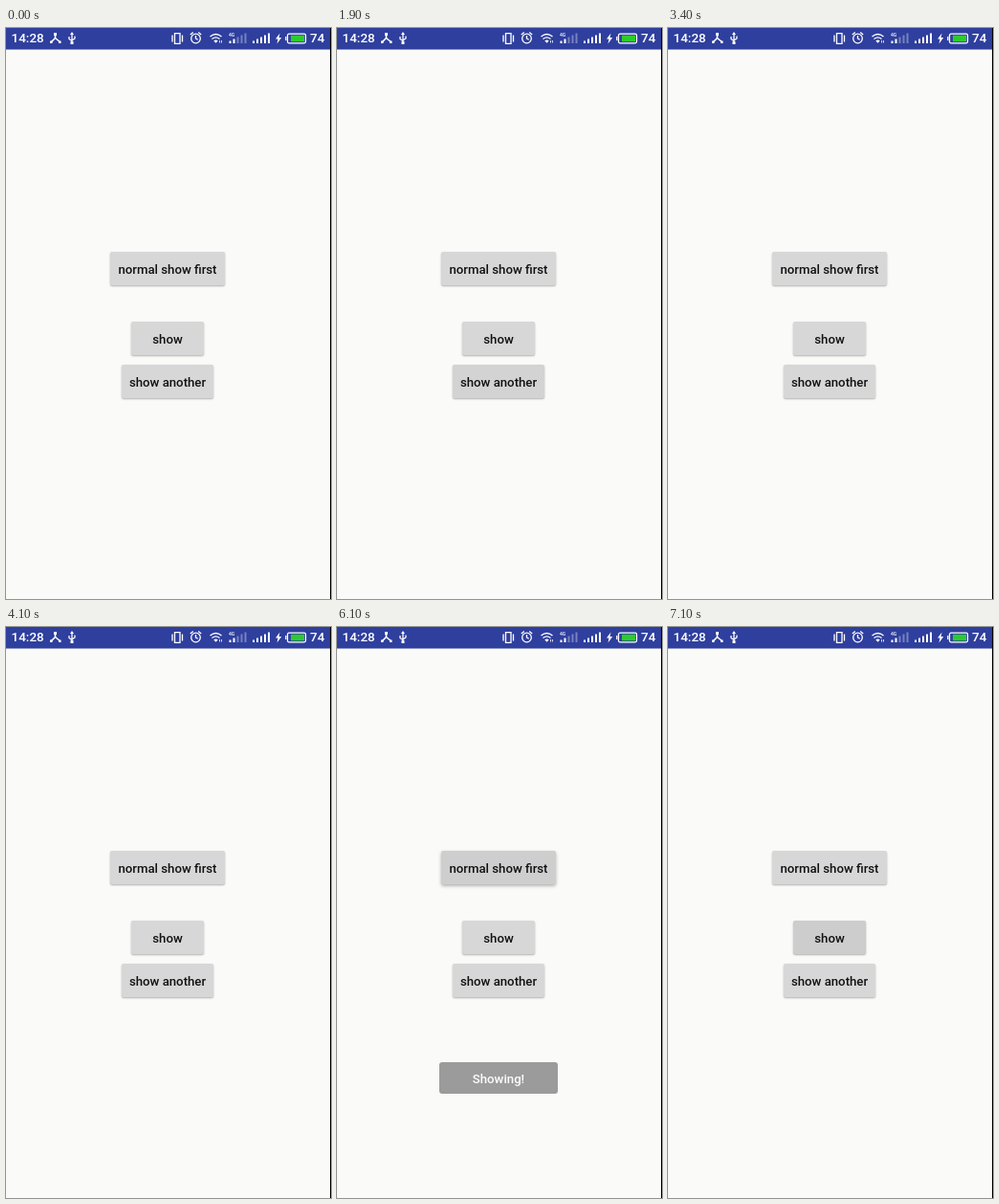
Recreate the animation shown at these times as an HTML page. Size 340 by 597 pixels, loop 8 s.

```html
<!DOCTYPE html>
<html lang="en">
<head>
<meta charset="utf-8">
<style>
html, body { margin: 0; width: 100%; height: 100%; overflow: hidden; background: #fafaf9; }
svg { position: absolute; left: 0; top: 0; }
.box {
  position: absolute; left: 169px; transform: translateX(-50%);
  box-sizing: border-box; height: 35px; padding-top: 1px; border-radius: 2px;
  display: flex; align-items: center; justify-content: center;
  font: 500 13.2px Roboto, sans-serif; color: #111; white-space: nowrap;
}
#first { top: 234px; width: 120px; }
#show { top: 307px; width: 76px; }
#another { top: 352px; width: 96px; }
#toast { top: 455px; width: 124px; height: 33px; background: #515151; color: #fff; border-radius: 3px; }
#dot {
  position: absolute; left: 174px; box-sizing: border-box; width: 22px; height: 22px; border-radius: 50%;
  background: rgba(250, 250, 255, .72); border: 1.2px solid rgba(150, 158, 195, .8);
}
</style>
</head>
<body>
<svg width="340" height="597" fill="none" stroke="#fff" stroke-width="1.3">
  <path d="M0 0h340v22.400H0z" fill="#2f3f9e" stroke="none"/>
  <path d="M339 0h1v597h-1z" fill="#000" stroke="none"/>
  <g fill="#fff" stroke="none" font-family="Roboto, sans-serif" font-size="13.5" font-weight="500">
    <text x="5.5" y="15">14:28</text>
    <text x="318" y="15">74</text>
    <text x="233" y="9" font-size="5">4G</text>
  </g>
  <!-- branch and USB -->
  <path d="M51.500 5v5.500L47 15M51.500 10.500L57 15" stroke-width="1.6"/>
  <path d="M50 5h3v3h-3zM46 13.500h2.500V16H46zM55 13.500h2.500V16H55z" fill="#fff" stroke="none"/>
  <path d="M69 6v9M66 9v2.500l3 2M72 8.500v2.500l-3 2"/>
  <path d="M69 4l2 3h-4zM67.500 14h3v3h-3z" fill="#fff" stroke="none"/>
  <!-- vibrate and alarm -->
  <path d="M176.500 5.700h5.500v10.600h-5.500zM174 7.500v7M184.500 7.500v7"/>
  <circle cx="198.500" cy="11" r="4.800"/>
  <path d="M198.500 8v3l2.200 1.300M192.800 7l3-2.500M204.200 7l-3-2.500"/>
  <!-- wifi -->
  <path d="M213.500 9q6-5 12 0M215.500 11.500q4-3.200 8 0"/>
  <path d="M217.300 13.200q2.200-1.600 4.400 0l-2.200 2.600z" fill="#fff" stroke="none"/>
  <path d="M223.500 15.500v-2.500M225.500 13v2.500" stroke-width=".8"/>
  <g id="bars" stroke-width="2"/>
  <!-- charge and battery -->
  <path d="M286.500 5.500l-4.500 6h2.500l-1 5 4.700-6.500h-2.700z" fill="#fff" stroke="none"/>
  <rect x="294.500" y="6.200" width="19" height="9.600" rx="1.500"/>
  <path d="M292.800 9v4"/>
  <path d="M298 7.700h14v6.600h-14z" fill="#2ccb2e" stroke="none"/>
</svg>
<div class="box" id="first">normal show first</div>
<div class="box" id="show">show</div>
<div class="box" id="another">show another</div>
<div class="box" id="toast">Showing!</div>
<div id="dot"></div>
<script>
const LOOP = 8000, FADE = 300, TOUCH = 200;
const $ = id => document.getElementById(id);
const centerY = { first: 252, show: 321, another: 370 };

// rest: how much of the pressed tint remains until the next tap
const taps = [
  { id: 'show', start: 300, end: 600, rest: .4 },
  { id: 'another', start: 1400, end: 1700, rest: .4 },
  { id: 'show', start: 2600, end: 3000, rest: 0 },
  { id: 'another', start: 3600, end: 4100, rest: 0 },
  { id: 'first', start: 5700, end: 6300, rest: 0 },
  { id: 'show', start: 6800, end: 7100, rest: 1 }
];

const ramp = (t, from, to) => Math.min(1, Math.max(0, (t - from) / (to - from)));

function addBars(x, lit) {
  for (let i = 0; i < 5; i++) {
    const alpha = i < lit ? 1 : .35;
    $('bars').innerHTML += `<path d="M${x + i * 4} 16v${-2.5 - i * 2}" stroke-opacity="${alpha}"/>`;
  }
}
addBars(234.5, 2);
addBars(259, 5);

function draw(t) {
  const tint = { first: 0, show: 0, another: 0 }, lift = { ...tint };
  taps.forEach(({ id, start, end, rest }, i) => {
    const progress = ramp(t, start, end), pulse = Math.sin(Math.PI * progress);
    const next = taps[i + 1]?.start ?? LOOP;
    tint[id] += (1 - rest) * pulse + rest * (progress - ramp(t, next, next + FADE));
    lift[id] += pulse;
  });
  for (const id in tint) {
    const shade = 215 - 10 * tint[id];
    $(id).style.background = `rgb(${shade},${shade},${shade})`;
    $(id).style.boxShadow = `0 ${1 + lift[id]}px ${2 + 2 * lift[id]}px rgba(0,0,0,.3)`;
  }
  $('toast').style.opacity = ramp(t, 5850, 6300) - ramp(t, 6850, 7100);

  const tap = taps.find(({ start }) => t >= start && t < start + TOUCH);
  $('dot').hidden = !tap;
  if (tap) $('dot').style.top = `${centerY[tap.id] - 11}px`;
}

const origin = performance.now();
function tick() {
  draw((performance.now() - origin) % LOOP);
  requestAnimationFrame(tick);
}
tick();
</script>
</body>
</html>
```
